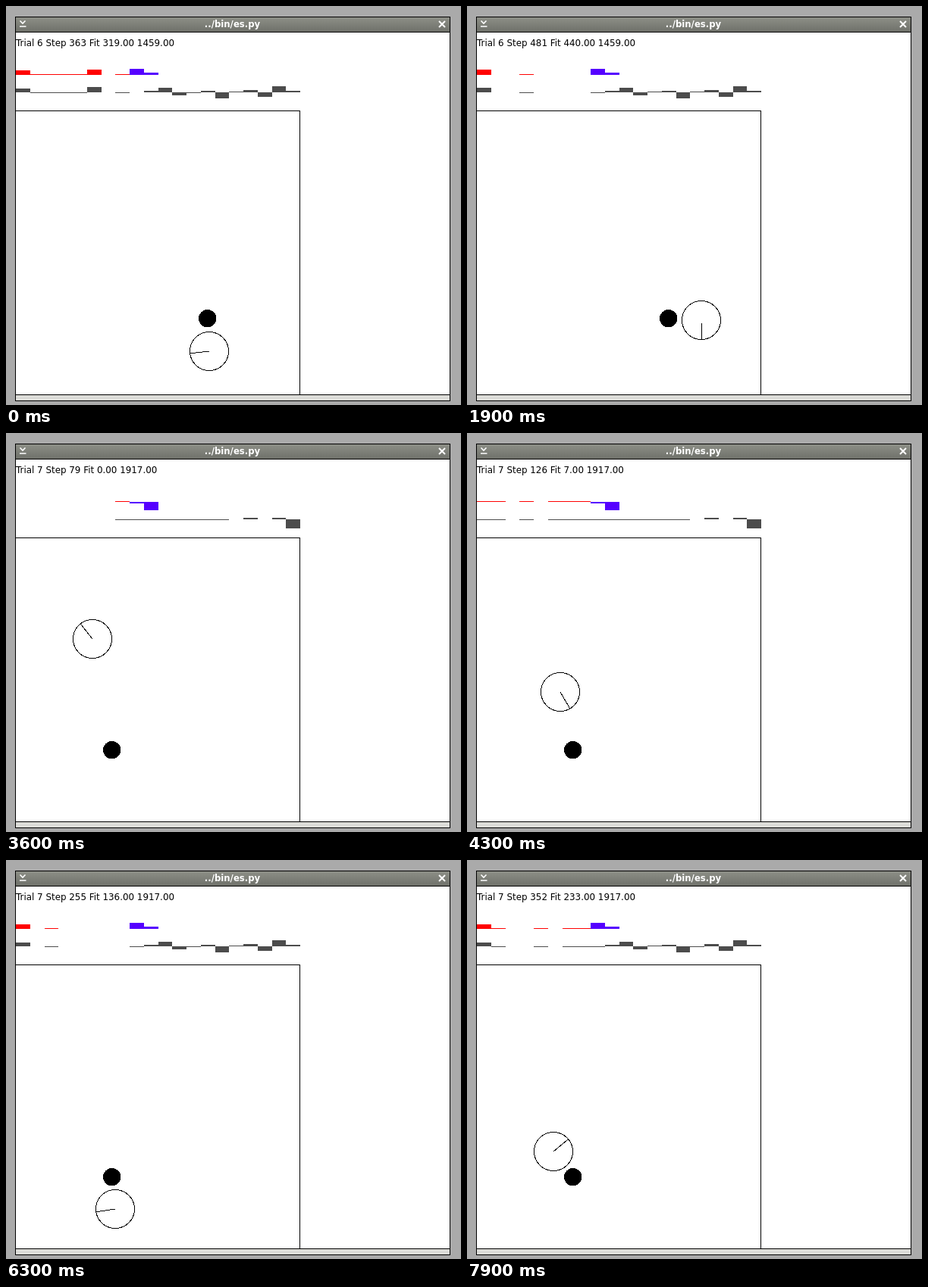
Recreate the animation shown at these times as an HTML page. Size 600 by 527 pixels, loop 8000 ms.

```html
<!DOCTYPE html>
<html lang="en">
<head>
<meta charset="utf-8">
<title>Robot simulation</title>
<style>
  html, body { margin: 0; width: 100%; height: 100%; overflow: hidden; background: #aaa; }
  svg { display: block; width: 600px; height: 527px; }
  text { font-family: "DejaVu Sans", sans-serif; font-size: 11.7px; white-space: pre; }
  #status { font-size: 11.9px; }
  .crisp { shape-rendering: crispEdges; }
</style>
</head>
<body>
<svg viewBox="0 0 600 527">
  <defs>
    <linearGradient id="bar" x2="0" y2="1">
      <stop offset="0" stop-color="#8d8f87"/>
      <stop offset="1" stop-color="#6f716a"/>
    </linearGradient>
  </defs>
  <g class="crisp">
    <rect width="600" height="527" fill="#aaa"/>
    <rect x="12" y="14" width="574" height="508" fill="#000"/>
    <rect x="13" y="15" width="572" height="19" fill="url(#bar)"/>
    <rect x="13" y="35" width="572" height="478" fill="#fff"/>
    <rect x="13" y="514" width="572" height="7" fill="#dcdcd8"/>
    <path d="M13 138.5H387.5V513" fill="none" stroke="#000"/>
  </g>
  <g fill="none" stroke="#fff" stroke-width="1.6">
    <path d="M18.5 19.5L22 23L25.5 19.5M18 27H26.5"/>
    <path d="M571 20L579 28M579 20L571 28" stroke-width="2"/>
  </g>
  <text x="298.5" y="28" text-anchor="middle" font-weight="bold" fill="#fff">../bin/es.py</text>
  <text id="status" x="13" y="53"></text>
  <g id="bars" class="crisp"></g>
  <g class="crisp">
    <circle id="disk" r="11.7"/>
    <g id="robot" fill="none" stroke="#000">
      <circle r="25.5"/>
      <path id="needle"/>
    </g>
  </g>
</svg>
<script>
const $ = id => document.getElementById(id);
const TICK = 100, TICKS = 80, RESET = 23;

// The robot circles the disk at a fixed turn per simulation step.
const FIRST = {
  name: 6, best: 1459, disk: [265.7, 412.7], radius: 43.4,
  steps: [[0, 363], [11, 432], [22, 499]],
  angle: step => 86.7 + 5.39 * (step - 363),
  fit: step => 319 + 1.026 * (step - 363)
};
const SECOND = {
  name: 7, best: 1917, disk: [139.7, 418.7], radius: 42.3,
  steps: [[26, 21], [36, 79], [50, 172], [63, 255], [79, 352]],
  angle: step => 8.8 + 5.247 * (step - 172),
  fit: step => Math.max(0, step - 119)
};

// Before that it spins toward the disk: step, x, y, heading.
const CONTACT = 150;
const APPROACH = [[21, 146, 182, 188], [79, 114, 272, 951.7], [CONTACT, 128, 378, 1780]];

// Typical hidden neuron levels in each behaviour.
const CIRCLING = [6, -4, 1, 2, -8, 1, 3, -6, 8, 2];
const SPINNING = [2, 2, 5, 2, 2, -1, 10, 0, 14, -15];

const mix = (a, b, u) => a + (b - a) * u;
const clamp = u => Math.min(1, Math.max(0, u));
const columns = (n, fn) => Array.from({ length: n }, (_, i) => fn(i));

function sample(rows, k) {
  let i = 0;
  while (i < rows.length - 2 && k >= rows[i + 1][0]) i++;
  const a = rows[i], b = rows[i + 1], u = (k - a[0]) / (b[0] - a[0]);
  return a.slice(1).map((v, j) => mix(v, b[j + 1], u));
}

function noise(k, i) {
  const v = Math.sin(k * 12.9898 + i * 78.233) * 43758.5453;
  return v - Math.floor(v);
}

const faint = (k, i) => noise(k, i) < .3 ? 1 : 0;

function spin(k, step) {
  const u = clamp((step - 21) / 58);
  const ir = columns(8, i => 9 * Math.exp(-i) * (1 - u) + faint(k, i));
  return {
    ir,
    motor: [mix(15, -2, u), mix(-6, -11, u)],
    sensed: columns(10, i => i < 8 ? ir[i] * .8 : mix(2, -1, u)),
    hidden: SPINNING.map((w, i) => w * mix(1, i < 9 ? .15 : .8, u))
  };
}

function circle(k) {
  const flare = noise(k, 5) < .5 ? 8 * noise(k, 9) : 0;
  const ir = columns(8, i => i === 0 ? 6 + 2 * noise(k, 0) : i === 5 ? flare : faint(k, i));
  return {
    ir,
    motor: [7.5 + noise(k, 40), 2.5 + noise(k, 41)],
    sensed: columns(10, i => i < 8 ? ir[i] * .9 : i === 8 ? 1 - 3 * noise(k, 8) : 1.5),
    hidden: CIRCLING.map((w, i) => w + noise(k, i + 10) - .5)
  };
}

function makeBars(count, first, base, color) {
  return columns(count, i => {
    const el = document.createElementNS("http://www.w3.org/2000/svg", "rect");
    el.setAttribute("x", 13 + 18.75 * (first + i));
    el.setAttribute("width", 18.75);
    el.setAttribute("fill", color);
    $("bars").append(el);
    return h => {
      const size = Math.abs(h) < .3 ? 0 : Math.max(1, Math.round(Math.abs(h)));
      el.setAttribute("height", size);
      el.setAttribute("y", h >= 1 ? base - size : base);
    };
  });
}

const meters = {
  ir: makeBars(8, 0, 91, "#f00"),
  motor: makeBars(2, 8, 91, "#50f"),
  sensed: makeBars(10, 0, 114, "#4c4c4c"),
  hidden: makeBars(10, 10, 114, "#4c4c4c")
};

function robotAt(trial, step) {
  if (step < CONTACT) return sample(APPROACH, step);
  const angle = trial.angle(step), a = angle * Math.PI / 180;
  const [x, y] = trial.disk;
  return [x + trial.radius * Math.cos(a), y + trial.radius * Math.sin(a), angle + 87];
}

function draw(k) {
  const trial = k < RESET ? FIRST : SECOND;
  const step = Math.round(sample(trial.steps, k)[0]);
  const fit = Math.round(trial.fit(step));
  $("status").textContent = `Trial ${trial.name} Step ${step} Fit ${fit}.00 ${trial.best}.00`;

  const levels = step < CONTACT - 15 ? spin(k, step) : circle(k);
  for (const name in meters) meters[name].forEach((set, i) => set(levels[name][i]));

  const [x, y, heading] = robotAt(trial, step);
  const h = heading * Math.PI / 180;
  $("disk").setAttribute("transform", `translate(${trial.disk})`);
  $("robot").setAttribute("transform", `translate(${Math.round(x)} ${Math.round(y)})`);
  $("needle").setAttribute("d", `M0 0L${25 * Math.cos(h)} ${25 * Math.sin(h)}`);
}

let shown = -1;
const start = performance.now();
function loop() {
  const k = Math.floor((performance.now() - start) / TICK) % TICKS;
  if (k !== shown) draw(shown = k);
  requestAnimationFrame(loop);
}
loop();
</script>
</body>
</html>
```
